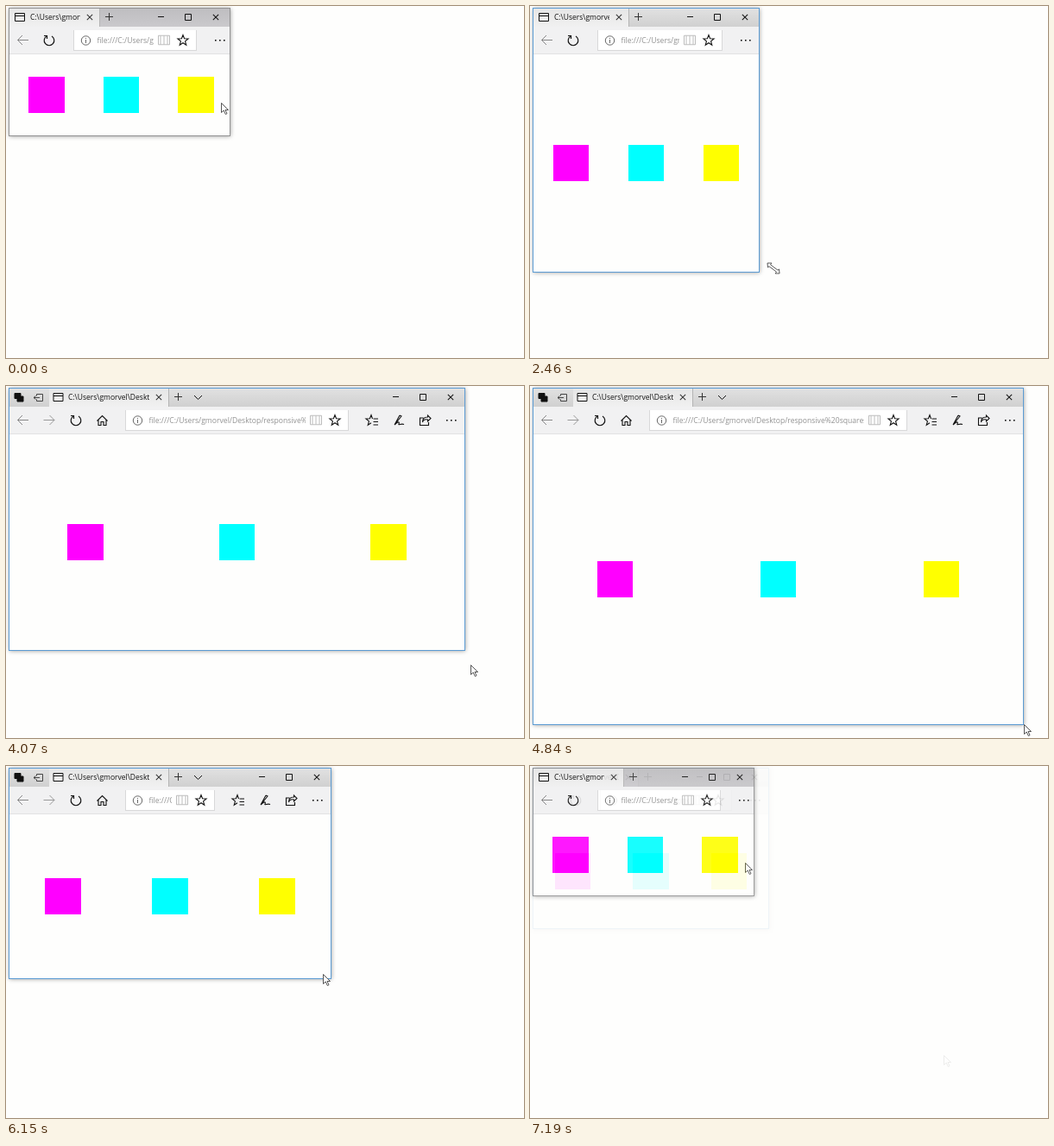
Recreate the animation shown at these times as an HTML page with a canvas. Size 600 by 408 pixels, loop 7.23 s.

```html
<!DOCTYPE html>
<html lang="en">
<head>
<meta charset="utf-8">
<title>Responsive squares</title>
<style>
html, body { margin: 0; width: 100%; height: 100%; overflow: hidden; background: #fefefd; }
canvas { position: absolute; left: 0; top: 0; }
</style>
</head>
<body>
<canvas id="scene" width="600" height="408"></canvas>
<canvas id="start" width="600" height="408"></canvas>
<script>
const LOOP = 7230, FADE = 6830, DRAG = 1340, LAG = 60;
const LEFT = 4, TOP = 2, TAB_BOTTOM = 24, BAR_BOTTOM = 56, BOX = 41.6, MIN_RIGHT = 264;
const PAPER = '#fefefd', INK = '#111';
const TITLE = 'C:\\Users\\gmorvel\\Desktop\\responsive';
const URL_TEXT = 'file:///C:/Users/gmorvel/Desktop/responsive%20squares/index.html';

// Turning points of the dragged corner: time, right, bottom
const DRAG_PATH = [
  [DRAG, 260, 150], [2030, 262, 304], [2460, 266, 308], [3150, 445, 262], [3300, 474, 236], [4070, 532, 306],
  [4230, 547, 350], [4840, 572, 392], [5030, 572, 392], [5690, 459, 287], [6690, 282, 198], [6760, 277, 188]
];
const HOME = [249, 112], AWAY = [479, 335];

const clamp = (v, lo = 0, hi = 1) => Math.min(hi, Math.max(lo, v));
const ramp = (t, from, length) => clamp((t - from) / length);
const mix = (a, b, p) => a.map((v, i) => v + (b[i] - v) * p);

function corner(t) {
  const i = clamp(DRAG_PATH.findLastIndex(k => k[0] <= t), 0, DRAG_PATH.length - 2);
  const [[t0, ...from], [t1, ...to]] = DRAG_PATH.slice(i, i + 2);
  return mix(from, to, ramp(t, t0, t1 - t0));
}

// The pointer comes to the corner, drags slightly ahead of it, then leaves.
const pointer = t =>
  mix(mix(HOME, corner(t + LAG), ramp(t, 260, 500)), AWAY, ramp(t, 6700, 130));

// Icons are centred on 0,0
const poly = (...pts) => 'M' + pts.join(' ');
const frame = (w, h, x = 0, y = 0) => `M${x - w / 2} ${y - h / 2}h${w}v${h}h${-w}z`;
const bars = (xs, h) => xs.map(x => poly(x, -h / 2, x, h / 2)).join('');
const rows = (ys, x, w) => ys.map(y => poly(x, y, x + w, y)).join('');
const starPoints = Array.from({ length: 10 }, (_, i) => {
  const a = i * Math.PI / 5, r = i % 2 ? 2.7 : 6.4;
  return [r * Math.sin(a), -r * Math.cos(a)];
}).flat();
const half = [-7, -6, -2, -6, -3.5, -4.2, 5, 2.2, 6.5, 1];

const ICON = {
  page: frame(11, 9) + rows([-1.5], -5.5, 11),
  stack: frame(7, 6, -1.5, -1.5) + frame(7, 6, 1.5, 2),
  aside: poly(-2, -2, -2, -4, 5, -4, 5, 4, -2, 4, -2, 2) + rows([0], -5.5, 7) + poly(-3, -2, -5.5, 0, -3, 2),
  plus: rows([0], -4.5, 9) + bars([0], 9),
  chevron: poly(-4.5, -2, 0, 2.5, 4.5, -2),
  minimize: rows([0], -3.5, 7),
  maximize: frame(7, 7),
  back: rows([0], -6, 12.5) + poly(-.5, -5.5, -6, 0, -.5, 5.5),
  reload: 'M-3-5A5.8 5.8 0 1 0 3-5' + poly(-6, -5.5, -2.5, -5.5, -2.5, -2),
  home: poly(-6, .5, 0, -5.5, 6, .5) + poly(-4.5, -1, -4.5, 5.5, -1.5, 5.5, -1.5, 1.5, 1.5, 1.5, 1.5, 5.5, 4.5, 5.5, 4.5, -1),
  info: 'M5.2 0A5.2 5.2 0 1 1-5.2 0A5.2 5.2 0 1 1 5.2 0M0-1V3M0-3V-2',
  book: frame(13, 10.5) + bars([-4, 0, 4], 10),
  star: poly(...starPoints) + 'z',
  hub: `M${starPoints.slice(10).map((v, i) => i % 2 ? v : v - 1.5).join(' ')} -1.5-6.4 0-2` + rows([-2, 1.5, 5], 1, 5.5),
  pen: poly(1, -6, 3, -5, -5, 5, 1, -6) + 'M-5 5C0 0 1 2 0 4S3 3 6 4.5',
  share: poly(-2, -3, -6, -3, -6, 5.5, 4, 5.5, 4, 2) + 'M-3 2Q-2-2 3-1V1L6.5-2.5 3-6V-4Q-3-4-3 2',
  arrow: poly(.5, .5, .5, 11.5, 3.2, 9, 5.3, 13.5, 7, 12.7, 5, 8.5, 8.5, 8.5) + 'z',
  resize: poly(...half, ...half.map(v => -v)) + 'z'
};
for (const name in ICON) ICON[name] = new Path2D(ICON[name]);

function draw(g, t) {
  const [R, B] = corner(t).map(Math.round);
  const active = t >= DRAG, wide = R >= 350, inner = Math.max(MIN_RIGHT, R);

  const rect = (color, x, y, w, h) => { g.fillStyle = color; g.fillRect(x, y, w, h); };
  const icon = (name, x, y, { color = INK, width = 1, fill, turn = 0 } = {}) => {
    g.save();
    g.translate(x, y);
    g.rotate(turn * Math.PI);
    if (fill) { g.fillStyle = fill; g.fill(ICON[name]); }
    g.strokeStyle = color;
    g.lineWidth = width;
    g.stroke(ICON[name]);
    g.restore();
  };
  const text = (str, x, y, size, color, end) => {
    g.save();
    g.beginPath();
    g.rect(x - 1, y - 12, end - x + 1, 18);
    g.clip();
    g.font = size + 'px "Open Sans", "Noto Sans", sans-serif';
    g.fillStyle = color;
    g.fillText(str, x, y);
    g.restore();
  };
  const shade = (top, bottom) => {
    const s = g.createLinearGradient(0, TOP, 0, TAB_BOTTOM);
    s.addColorStop(0, top);
    s.addColorStop(1, bottom);
    return s;
  };

  rect(PAPER, 0, 0, 600, 408);
  g.save();
  g.shadowColor = 'rgba(0,0,0,.4)';
  g.shadowBlur = 5;
  g.shadowOffsetY = 1;
  rect(PAPER, LEFT, TOP, R - LEFT, B - TOP);
  g.restore();

  g.save();
  g.beginPath();
  g.rect(LEFT, TOP, R - LEFT, B - TOP);
  g.clip();

  // Tab strip
  rect(active ? shade('#e2e2e2', '#d0d0d0') : shade('#bebdc0', '#cac9cc'), LEFT, TOP, R - LEFT, 22);
  const tabLeft = wide ? 50 : LEFT;
  const tabRight = wide ? 188 : Math.min(142, R - 152);
  rect(shade('#e6e6e6', '#f0f0f0'), tabLeft, TOP, tabRight - tabLeft, 22);
  rect('#b4b4b4', tabRight, TOP, 1, 22);
  if (wide) {
    icon('stack', 15, 13, { fill: INK });
    icon('aside', 37.5, 13.5, { color: '#444' });
    icon('chevron', 222.5, 13);
  }
  icon('page', wide ? 60.5 : 16, 13);
  text(TITLE, wide ? 72 : 28, 16, 8.5, INK, tabRight - 22);
  icon('plus', tabRight - 11, 13, { turn: .25, color: '#333' });
  icon('plus', tabRight + 11.5, 12.5, { color: '#333' });
  icon('minimize', R - 80.5, 12.5);
  icon('maximize', R - 49, 13);
  icon('plus', R - 17, 13, { turn: .25 });

  // Toolbar
  rect('#f1f1f2', LEFT, TAB_BOTTOM, R - LEFT, 32);
  rect('#e2e2e3', LEFT, BAR_BOTTOM - 1, R - LEFT, 1);
  const shift = Math.round(4 * ramp(inner, 266, 16));
  icon('back', 19.5, 39.5, { color: '#888' });
  if (wide) {
    icon('back', 50, 39.5, { turn: 1, color: '#999' });
    icon('home', 111.5, 40, { width: 1.1 });
  }
  icon('reload', wide ? 81 : 50 + shift, 40, { width: 1.2 });
  const urlLeft = wide ? 138 : 78 + shift;
  const urlRight = wide ? R - 135 : inner - 43;
  rect('#d8d8d9', urlLeft, 28, urlRight - urlLeft, 24);
  rect('#fff', urlLeft + 1, 28, urlRight - urlLeft - 2, 23);
  icon('info', urlLeft + 14.5, 40, { color: '#555', width: .9 });
  text(URL_TEXT, urlLeft + 27.5, 43, 8.6, '#929292', urlRight - 50);
  icon('book', urlRight - 38, 39.5, { color: '#b5b5b5', width: .9 });
  icon('star', urlRight - 16, 40, { width: 1.1 });
  if (wide) ['hub', 'pen', 'share'].forEach((name, i) => {
    g.globalAlpha = ramp(t, 3130 + i * 40, 200);
    icon(name, R - 107.5 + i * 30.5, 40, { width: 1.1 });
    g.globalAlpha = 1;
  });
  for (let i = 0; i < 3; i++) rect(INK, inner - 22 + i * 5, 39, 1.6, 1.6);

  // Page: three squares spaced evenly around the middle line
  const cell = (inner - 1 - LEFT) / 3;
  const y = Math.floor((BAR_BOTTOM + B - 42) / 2);
  ['#f0f', '#0ff', '#ff0'].forEach((color, i) => {
    const mid = LEFT + cell * (i + .5);
    const x = Math.round(mid - BOX / 2);
    rect(color, x, y, Math.round(mid + BOX / 2) - x, 42);
  });
  g.restore();

  g.lineWidth = 1;
  g.strokeStyle = active ? '#5b9bd3' : '#929292';
  g.strokeRect(LEFT - .5, TOP + .5, R - LEFT, B - TOP);

  const resizing = t > 700 && t < 3140;
  icon(resizing ? 'resize' : 'arrow', ...pointer(t).map(Math.round), { color: '#444', width: .9, fill: '#fff' });
}

const scene = document.getElementById('scene').getContext('2d');
const start = document.getElementById('start');
draw(start.getContext('2d'), 0);

function tick() {
  const t = performance.now() % LOOP;
  draw(scene, t);
  start.style.opacity = ramp(t, FADE, LOOP - FADE);
  requestAnimationFrame(tick);
}
tick();
</script>
</body>
</html>
```
